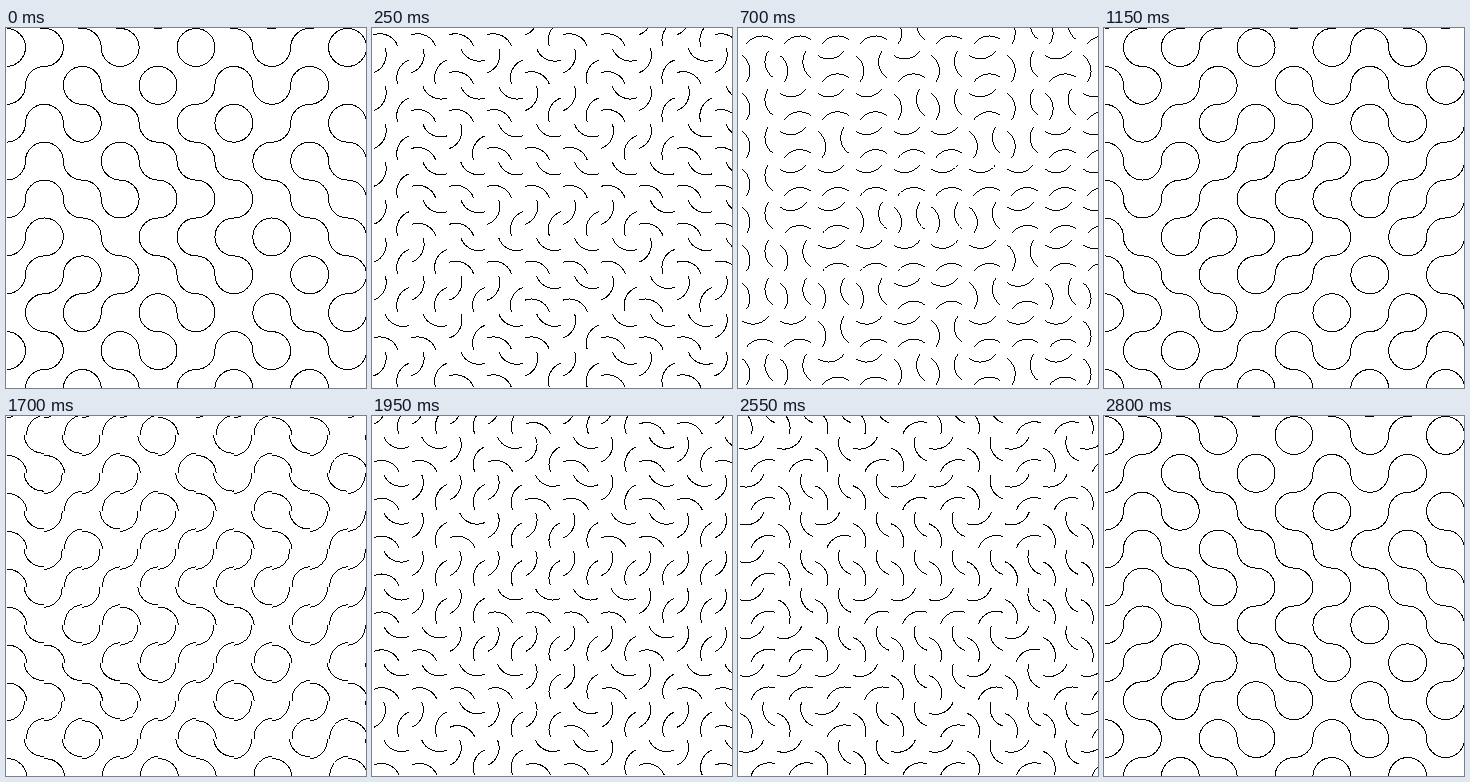
Animation, 360 px wide and 360 px high, one loop 3.3 s. Source, as an HTML page:

```html
<!DOCTYPE html>
<html lang="en">
<head>
<meta charset="utf-8">
<title>Turning tiles</title>
<style>
  html, body { margin: 0; width: 100%; height: 100%; overflow: hidden; background: #fff; }
  svg { display: block; width: 360px; height: 360px; }
</style>
</head>
<body>
<svg id="stage" viewBox="0 0 360 360" fill="none" stroke="#000" stroke-width="1"
     shape-rendering="crispEdges"></svg>
<script>
const stage = document.getElementById('stage');

const SIZE = 360 / 9.5;
const R = SIZE / 2;
const PIXEL = 0.5;      // puts the hairlines on pixel centres
const STEP = 50;        // ms per tick
const HALF = 33;        // ticks per quarter turn, rest included
const TURN = 23;        // ticks spent turning

// V: arcs start top-left and bottom-right; H: the other two corners.
const rows = [
  'HHHHVHHVVH',
  'VVHVHVHVHV',
  'VHHHVVHVVH',
  'VHVHHHVVHH',
  'VHHHHHHHHH',
  'VHHVVVVHHH',
  'VVHHHHHVHH',
  'VVVVHHVHVV',
  'HHVHHVHHHV',
  'VVHHVVHVHV'
];

const ARCS = `M0 ${-R}A${R} ${R} 0 0 1 ${-R} 0M0 ${R}A${R} ${R} 0 0 1 ${R} 0`;

function makeTile(kind, c, r) {
  const path = document.createElementNS('http://www.w3.org/2000/svg', 'path');
  path.setAttribute('d', ARCS);
  stage.append(path);
  return {
    path,
    x: (c + 0.5) * SIZE + PIXEL,
    y: r * SIZE + PIXEL,
    start: kind === 'H' ? 90 : 0
  };
}

const tiles = rows.flatMap((row, r) => [...row].map((kind, c) => makeTile(kind, c, r)));

function draw(time) {
  const tick = Math.floor(time / STEP) % (2 * HALF);
  const turns = Math.floor(tick / HALF) + Math.min(tick % HALF, TURN) / TURN;
  for (const { path, x, y, start } of tiles) {
    path.setAttribute('transform', `translate(${x} ${y}) rotate(${start - turns * 90})`);
  }
}

let origin;
function loop(now) {
  origin ??= now;
  draw(now - origin);
  requestAnimationFrame(loop);
}
draw(0);
requestAnimationFrame(loop);
</script>
</body>
</html>
```
